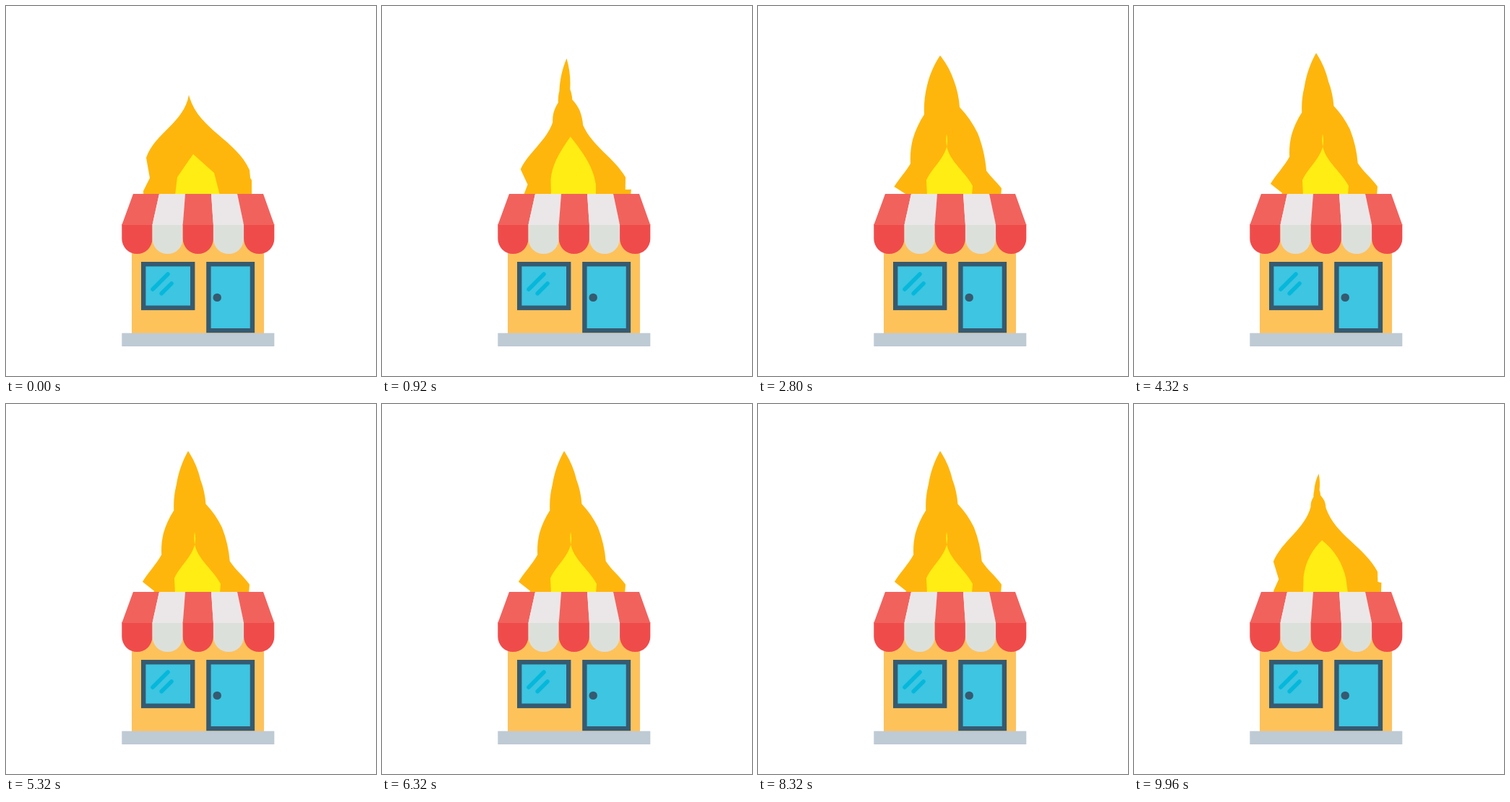
Animation, 512 px wide and 512 px high, one loop 10000 ms. Source, as an HTML page:

```html
<!DOCTYPE html>
<html lang="en">
<head>
<meta charset="utf-8">
<title>Burning shop</title>
<style>
html, body { margin: 0; width: 100%; height: 100%; overflow: hidden; background: #fff; }
svg { display: block; width: 100vw; height: 100vh; }
</style>
</head>
<body>
<svg viewBox="0 0 512 512">
  <defs><clipPath id="sky"><rect width="512" height="261"/></clipPath></defs>
  <g clip-path="url(#sky)">
    <path id="outer" fill="#ffb60c"/>
    <path id="inner" fill="#ffed14"/>
  </g>
  <rect x="174" y="300" width="183" height="153" fill="#fec25b"/>
  <g id="awning"></g>
  <rect x="190.2" y="357.2" width="68" height="60.5" fill="#3dc5e1" stroke="#365a70" stroke-width="6.4"/>
  <path d="M203 392L224 371M215.2 397.7L229 384" stroke="#05b8db" stroke-width="5.6" stroke-linecap="round"/>
  <rect x="280.4" y="357.2" width="60.5" height="92" fill="#3dc5e1" stroke="#365a70" stroke-width="6.4"/>
  <circle cx="292.2" cy="403.4" r="5.7" fill="#365a70"/>
  <rect x="160.3" y="452.6" width="211" height="18.4" fill="#becad4"/>
</svg>
<script>
const $ = id => document.getElementById(id);
const PERIOD = 500, STEP = 40, PEAK = 380, GROWN = 800;
const CROWN = [253, 123];

// Each edge point rises from below the roof, passes two places and ends in the crown.
const edges = {
  left: {
    shoulder: [[180, 310], [194, 210], [234, 110]],
    notch: [[215, 295], [199, 238], [230, 150]],
    bulge: [[230, 285], [190, 256], [214, 185]],
    neck: [[200, 380], [192, 300], [211, 218]]
  },
  right: {
    shoulder: [[337, 290], [337, 227], [271, 103]],
    notch: [[330, 338], [338, 238], [279, 140]],
    bulge: [[370, 320], [340, 241], [304, 176]],
    neck: [[340, 380], [340, 310], [316, 228]]
  }
};

const clamp = u => Math.min(1, Math.max(0, u));
const mix = (a, b, u) => a + (b - a) * u;
const between = (p, q, u) => [mix(p[0], q[0], u), mix(p[1], q[1], u)];

function place([low, mid, high], age) {
  if (age < PERIOD) return between(low, mid, age / PERIOD);
  if (age < GROWN) return between(mid, high, (age - PERIOD) / (GROWN - PERIOD));
  return between(high, CROWN, (age - GROWN) / (2 * PERIOD - GROWN));
}

// Curve whose handles lie at the thirds, pushed outwards by k1 and k2.
function curve([ax, ay], [bx, by], [k1, k2]) {
  const dx = bx - ax, dy = by - ay;
  const handle = (u, k) => `${ax + dx * u - dy * k} ${ay + dy * u + dx * k}`;
  return `C${handle(1 / 3, k1)} ${handle(2 / 3, k2)} ${bx} ${by}`;
}

function outline(tip, left, right, bends) {
  const l = [tip, ...left], r = [tip, ...right], n = left.length;
  let d = `M${tip}`;
  for (let i = 0; i < n; i++) d += curve(l[i], l[i + 1], bends[i]);
  d += `L${l[n][0]} 350L${r[n][0]} 350L${r[n]}`;
  for (let i = n; i > 0; i--) d += curve(r[i], r[i - 1], [...bends[i - 1]].reverse());
  return d + "Z";
}

// Shoulders flare while young; every edge swells as it ages.
function bend(name, age) {
  const swell = clamp((age - PERIOD) / (GROWN - PERIOD));
  if (name !== "shoulder") return [.05 * swell, .05 * swell];
  const flare = clamp(age / PERIOD) ** 3;
  return [mix(-.155 * flare, .06, swell), mix(.09 * flare, .06, swell)];
}

function outerFlame(t, fall) {
  const ages = [t + PERIOD, t];
  const side = s => ages.flatMap(age => Object.values(edges[s]).map(path => place(path, age)));
  const bends = ages.flatMap(age => Object.keys(edges.left).map(name => bend(name, age)));
  const y = mix(CROWN[1], 54, t < PEAK ? t / PEAK : 1 - fall ** 1.2);
  const tip = [CROWN[0] - clamp(t / 300) + 4 * Math.sin(Math.PI * fall), y];
  return outline(tip, side("left"), side("right"), bends);
}

function innerFlame(t, fall) {
  const s = t < 300 ? t / 300 : 1 - ((t - 300) / 200) ** 4;
  const round = .14 * Math.sin(Math.PI * fall);
  const pinch = .25 * s * (1 - fall) ** 3;
  return outline([259 + 2 * s, 205 - 28 * s],
    [[237 - 4 * s, 237 + 4 * s], [234, 262]],
    [[288 + 9 * s, 231 + 18 * s], [296, 262]],
    [[round - pinch, round], [0, 0]]);
}

function awning() {
  const w = 42.2;
  let s = "";
  for (let i = 0; i < 5; i++) {
    const x = 160.3 + i * w, top = 176 + i * 36, red = i % 2 === 0;
    s += `<path d="M${x} 302v20a${w / 2} ${w / 2} 0 0 0 ${w} 0v-20z" fill="${red ? "#f04b4b" : "#dce0db"}"/>`;
    s += `<path d="M${top} 260h36L${x + w} 303h${-w}z" fill="${red ? "#f2625c" : "#ebe7e8"}"/>`;
  }
  $("awning").innerHTML = s;
}

function draw(now) {
  const t = Math.floor((now % 10000) / STEP) * STEP % PERIOD;
  const fall = clamp((t - PEAK) / (PERIOD - PEAK));
  $("outer").setAttribute("d", outerFlame(t, fall));
  $("inner").setAttribute("d", innerFlame(t, fall));
}

awning();
draw(0);
let start;
requestAnimationFrame(function loop(now) {
  start ??= now;
  draw(Math.max(0, now - start));
  requestAnimationFrame(loop);
});
</script>
</body>
</html>
```
